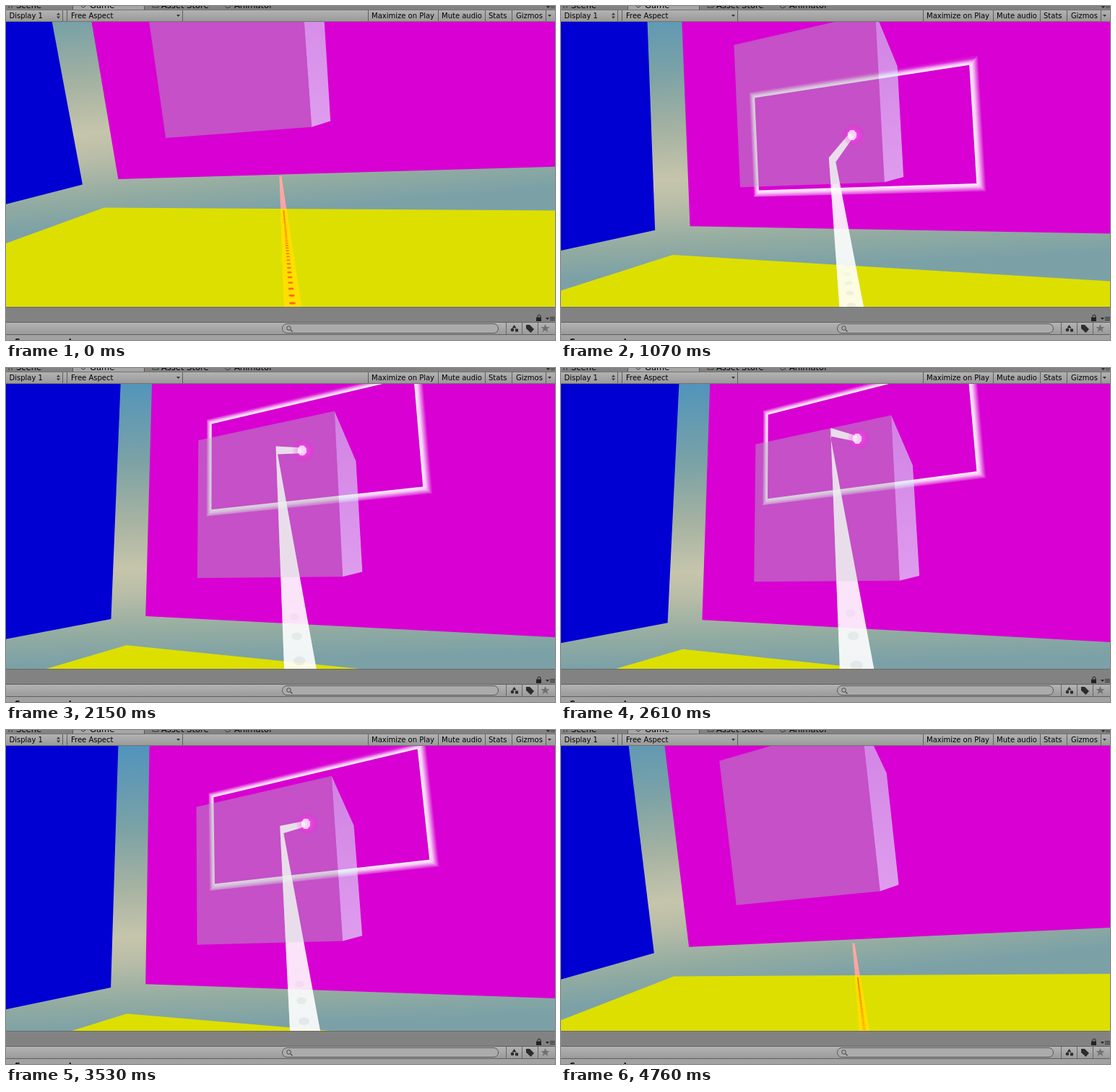
Recreate the animation shown at these times as an HTML page with a canvas. Size 760 by 463 pixels, loop 4.84 s.

```html
<!DOCTYPE html>
<html lang="en">
<head>
<meta charset="utf-8">
<title>Pointer beam in a game view</title>
<style>
  html, body { margin: 0; width: 100%; height: 100%; overflow: hidden; background: #828282; }
  svg { position: absolute; left: 0; top: 0; }
  canvas { position: absolute; left: 0; top: 22px; }
  text { font-family: "DejaVu Sans", sans-serif; font-size: 10px; fill: #000; }
  .tab { font-size: 11.5px; }
  .bold { font-size: 11px; font-weight: bold; }
</style>
</head>
<body>
<svg width="760" height="463" viewBox="0 0 760 463">
  <defs>
    <linearGradient id="bar" x1="0" y1="0" x2="0" y2="1">
      <stop offset="0" stop-color="#b4b4b4"/>
      <stop offset="1" stop-color="#999"/>
    </linearGradient>
  </defs>
  <rect width="760" height="463" fill="#828282"/>
  <path d="M93 0H191V5H93Z" fill="#a6a6a6"/>
  <path d="M92.500 0V5M191.500 0V5" stroke="#555"/>
  <text class="tab" x="14" y="3">Scene</text>
  <text class="tab" x="116" y="3">Game</text>
  <text class="tab" x="215" y="3">Asset Store</text>
  <text class="tab" x="316" y="3">Animator</text>
  <path d="M4 0V3M8 0V3M104 0q3 4 6 0M203 0V2H211V0M303 0l3 3 5-2" fill="none" stroke="#333"/>
  <path d="M748 0H753L750.500 3ZM754 .5H760M754 2.500H760" fill="#333" stroke="#333" stroke-width=".7"/>
  <rect y="5" width="760" height="17" fill="url(#bar)"/>
  <path d="M0 5.500H760M0 21.500H760" stroke="#737373"/>
  <path d="M78.500 6V21M84.500 6V21M244.500 6V21M501.500 6V21M598.500 6V21M663.500 6V21M700.500 6V21M747.500 6V21" stroke="#5e5e5e"/>
  <path d="M70 12.500L72.500 9.500 75 12.500ZM70 14.500H75L72.500 17.500ZM236 12H241L238.500 15ZM750 12H755L752.500 15Z" fill="#333"/>
  <text x="4.500" y="17">Display 1</text>
  <text x="90" y="17">Free Aspect</text>
  <text x="506" y="17">Maximize on Play</text>
  <text x="603" y="17">Mute audio</text>
  <text x="668" y="17">Stats</text>
  <text x="706" y="17">Gizmos</text>

  <path d="M0 417.500H760" stroke="#6a6a6a"/>
  <path d="M734 431.500H741V437H734Z" fill="#222"/>
  <path d="M736 431.500V430a2 2 0 0 1 4 0V432" fill="none" stroke="#222"/>
  <path d="M747 432H752L749.500 435Z" fill="#222"/>
  <path d="M753 431.500H760M753 433.500H760M753 435.500H760" stroke="#333"/>
  <rect y="438" width="760" height="18" fill="url(#bar)"/>
  <path d="M0 438.500H760M0 455.500H760" stroke="#606060"/>
  <rect x="382.500" y="440.500" width="299" height="13" rx="6.500" fill="#ababab" stroke="#585858"/>
  <path d="M394 449L396.500 451.500" stroke="#444" stroke-width="1.200"/>
  <circle cx="391.500" cy="446.500" r="2.800" fill="none" stroke="#444"/>
  <path d="M692.500 439V455M714.500 439V455M736.500 439V455" stroke="#666"/>
  <path d="M703.500 442l3 4.500h-6ZM705 447.500h4v4h-4Z" fill="#2c2c2c"/>
  <circle cx="701" cy="449" r="2.300" fill="#2c2c2c"/>
  <path d="M720 442h5l6 6-4.500 5-6.500-6Z" fill="#2c2c2c"/>
  <path d="M746.500 441l1.700 4h4.300l-3.400 2.800 1.300 4.300-3.900-2.600-3.900 2.600 1.300-4.300-3.400-2.800h4.300Z" fill="#707070"/>
  <rect y="456" width="760" height="7" fill="#a2a2a2"/>
  <text class="bold" x="12" y="469">Scene sounds</text>
</svg>
<canvas id="view" width="760" height="395"></canvas>
<script>
const ctx = document.getElementById('view').getContext('2d');
const LOOP = 4840, STEPS = 63;
const TOP = 22, BOTTOM = 417, CX = 380, CY = 219.5, FOCAL = 430;

// Head and hand: step, yaw, pitch, roll (degrees), pointer tip on screen (x, y).
const MOVES = [
  [0, -17.8, -8.7, 5, 380, 237],
  [14, -20.3, 1.35, 2.9, 402, 179],
  [22, -21.8, 5.5, 1.9, 408, 142],
  [34, -22.8, 7.8, 1.4, 409, 98],
  [46, -22.3, 7.7, 2.4, 414, 130],
  [54, -20.5, 3.1, 4.7, 417, 208],
  [62, -19.6, -.95, 6.4, 405, 297]
];

// Room seen from the origin: x to the right, y up, z towards the pink wall.
const WALL_Z = 10, WALL_X = -10.27, WALL_Y = -1.96, FAR = 18;
const BLUE_X = -11.15, GAP_Z = 9.1, FLOOR_Y = -2.9;
const AREA = { w: 4, h: 2, rim: .24 };

const add = (a, b, s = 1) => a.map((v, i) => v + b[i] * s);
const dot = (a, b) => a.reduce((sum, v, i) => sum + v * b[i], 0);
const clamp = v => Math.min(1, Math.max(0, v));

// Smooth cubic through the moves.
function move(k) {
  let i = 0;
  while (i < MOVES.length - 2 && k >= MOVES[i + 1][0]) i++;
  const a = MOVES[i], b = MOVES[i + 1], h = b[0] - a[0], u = (k - a[0]) / h, w = 1 - u;
  const slope = (j, c) => (MOVES[j + 1][c] - MOVES[j][c]) / (MOVES[j + 1][0] - MOVES[j][0]);
  const tangent = (j, c) => {
    if (j === 0) return slope(0, c);
    if (j === MOVES.length - 1) return slope(j - 1, c);
    const p = MOVES[j][0] - MOVES[j - 1][0], q = MOVES[j + 1][0] - MOVES[j][0];
    return (slope(j - 1, c) * q + slope(j, c) * p) / (p + q);
  };
  return a.map((v, c) =>
    w * w * ((1 + 2 * u) * v + u * h * tangent(i, c)) +
    u * u * ((3 - 2 * u) * b[c] - w * h * tangent(i + 1, c)));
}

let cam;
function aimCamera(yaw, pitch, roll) {
  const [a, p, r] = [yaw, pitch, roll].map(d => d * Math.PI / 180);
  const side = [Math.cos(a), 0, -Math.sin(a)];
  const lift = [-Math.sin(a) * Math.sin(p), Math.cos(p), -Math.cos(a) * Math.sin(p)];
  cam = {
    pitch: p, roll: r,
    right: side.map((v, i) => v * Math.cos(r) - lift[i] * Math.sin(r)),
    up: side.map((v, i) => v * Math.sin(r) + lift[i] * Math.cos(r)),
    ahead: [Math.sin(a) * Math.cos(p), Math.sin(p), Math.cos(a) * Math.cos(p)]
  };
}

const toCam = p => [dot(p, cam.right), dot(p, cam.up), dot(p, cam.ahead)];
const toScreen = ([x, y, z]) => [CX + FOCAL * x / z, CY - FOCAL * y / z];
const project = p => toScreen(toCam(p));

function onWall([x, y]) {
  const ray = add(add(cam.ahead, cam.right, (x - CX) / FOCAL), cam.up, (CY - y) / FOCAL);
  return ray.map(v => v * WALL_Z / ray[2]);
}

function poly(points, fill) {
  ctx.beginPath();
  for (const p of points) ctx.lineTo(p[0], p[1]);
  ctx.closePath();
  ctx.fillStyle = fill;
  ctx.fill();
}

// Fills a flat 3D shape, cut at the near plane.
function face(points, fill) {
  const near = .3, cut = [], view = points.map(toCam);
  view.forEach((p, i) => {
    const q = view[(i + 1) % view.length];
    if (p[2] > near) cut.push(p);
    if ((p[2] > near) !== (q[2] > near)) {
      const t = (near - p[2]) / (q[2] - p[2]);
      cut.push(p.map((v, j) => v + (q[j] - v) * t));
    }
  });
  poly(cut.map(toScreen), fill);
}

function ramp(from, to, stops) {
  const g = ctx.createLinearGradient(...from, ...to);
  for (const [at, color] of stops) g.addColorStop(at, color);
  return g;
}

function ellipse(x, y, rx, ry, fill) {
  ctx.beginPath();
  ctx.ellipse(x, y, rx, ry, 0, 0, 2 * Math.PI);
  ctx.fillStyle = fill;
  ctx.fill();
}

function drawRoom() {
  const level = [CX, CY + FOCAL * Math.tan(cam.pitch)];
  const down = [Math.sin(cam.roll), Math.cos(cam.roll)];
  ctx.fillStyle = ramp(add(level, down, -270), add(level, down, 130), [
    [0, '#4e93bd'], [.3, '#7ba2a6'], [.5, '#a5b2a1'], [.675, '#c6c5ac'],
    [.76, '#b9bda7'], [.9, '#92aba1'], [1, '#7ba1a7']
  ]);
  ctx.fillRect(0, TOP, 760, BOTTOM - TOP);
  face([[BLUE_X, WALL_Y, GAP_Z], [BLUE_X, FAR, GAP_Z], [BLUE_X, FAR, 0], [BLUE_X, WALL_Y, 0]], '#0000d2');
  face([[WALL_X, WALL_Y, WALL_Z], [WALL_X, FAR, WALL_Z], [FAR, FAR, WALL_Z], [FAR, WALL_Y, WALL_Z]], '#d800d2');
  face([[WALL_X, FLOOR_Y, GAP_Z], [FAR, FLOOR_Y, GAP_Z], [FAR, FLOOR_Y, 0], [WALL_X, FLOOR_Y, 0]], '#dddf00');
}

function drawArea(center) {
  const corners = (w, h) => [[-w, h], [w, h], [w, -h], [-w, -h]].map(([x, y]) => project(add(center, [x, y, 0])));
  const out = corners(AREA.w, AREA.h), inn = corners(AREA.w - AREA.rim, AREA.h - AREA.rim);
  for (let i = 0; i < 4; i++) {
    const j = (i + 1) % 4, edge = add(inn[j], inn[i], -1), len = Math.hypot(...edge);
    const normal = [edge[1] / len, -edge[0] / len];
    const from = add(inn[i], edge, .5), depth = dot(add(out[i], inn[i], -1), normal);
    poly([inn[i], inn[j], out[j], out[i]], ramp(from, add(from, normal, depth), [
      [0, 'rgba(255,255,255,.96)'], [.35, 'rgba(255,255,255,.8)'], [1, 'rgba(255,255,255,.08)']
    ]));
  }
}

function drawCube() {
  const x0 = -3.84, x1 = -1.02, y0 = -.21, y1 = 2.58, z0 = 5, z1 = 7.6;
  const backX = -1.08, backTop = 2.5;
  face([[x0, y1, z0], [x1, y1, z0], [x1, y0, z0], [x0, y0, z0]], 'rgba(174,178,184,.45)');
  face([[x1, y1, z0], [backX, backTop, z1], [backX, y0, z1], [x1, y0, z0]],
    ramp(project([x1, y1, z0]), project([backX, y0, z1]), [
      [0, 'rgba(205,224,241,.58)'], [1, 'rgba(226,255,255,.61)']
    ]));
}

// The higher the hand points, the wider and the more bent the beam looks.
function shapeBeam(k, tip) {
  const y = tip[1], center = 397 + .37 * k, half = 32 - .085 * y;
  const bend = [tip[0] - 36 + .118 * (y - 98), y + .536 * (y - 115)];
  const dx = tip[0] - bend[0], dy = y - bend[1];
  const normal = (a, b, size) => [-b * size / Math.hypot(a, b), a * size / Math.hypot(a, b)];
  return {
    tip, bend, center, half,
    base: [[center - half, BOTTOM], [center + half, BOTTOM]],
    elbow: normal(dx, dy - 8, 5.6),
    end: normal(dx, dy, 3.8),
    squash: .8 - .0031 * (y - 98),
    step: Math.min(.45, .37 - .0028 * (y - 237)) / 1000
  };
}

// Discs run away from the viewer, so the inverse of their distance grows evenly.
function drawDiscs(k, b, start, near, paint) {
  const phase = (.45 + k / 24) % 1, span = BOTTOM - start[1];
  for (let n = 1; n < 120; n++) {
    const d = 1 / ((n + phase) * b.step), u = d / span;
    if (d > span + 8) continue;
    if (d < near) break;
    const rx = u * b.half * .38;
    paint(start[0] + (b.center - start[0]) * u, start[1] + d, rx, rx * b.squash, u);
  }
}

function drawMiss(k, b) {
  const [x, y] = b.tip;
  ctx.globalCompositeOperation = 'lighter';
  poly([[x - 1.5, y], [x + 1.5, y], b.base[1], b.base[0]], 'rgb(125,0,0)');
  ctx.globalCompositeOperation = 'source-over';
  ellipse(x, y, 2, 2, '#f3a59c');
  drawDiscs(k, b, b.tip, 46, (px, py, rx, ry) =>
    ellipse(px, py, rx, Math.max(ry, .6), `rgba(255,85,0,${Math.min(.9, .45 + .28 * ry)})`));
}

function drawBeam(b, alpha) {
  poly([b.base[0], add(b.bend, b.elbow, -1), add(b.tip, b.end, -1),
        add(b.tip, b.end), add(b.bend, b.elbow), b.base[1]], `rgba(255,255,255,${alpha})`);
}

function drawTip([x, y]) {
  const blob = [];
  for (let i = 0; i < 8; i++) {
    const a = (i + .5) * Math.PI / 4;
    blob.push([x + 1 + 6.5 * Math.cos(a), y + 7.5 * Math.sin(a)]);
  }
  poly(blob, 'rgba(255,255,255,.75)');
}

function drawGlow([x, y]) {
  const glow = ctx.createRadialGradient(x + 3, y, 2, x + 3, y, 15);
  glow.addColorStop(0, 'rgba(255,80,250,.85)');
  glow.addColorStop(.5, 'rgba(245,55,232,.65)');
  glow.addColorStop(1, 'rgba(235,40,220,.15)');
  ellipse(x + 3, y, 15, 15, glow);
}

function draw(k) {
  const [, yaw, pitch, roll, x, y] = move(k);
  aimCamera(yaw, pitch, roll);
  const b = shapeBeam(k, [x, y]), target = onWall(b.tip);
  const hit = target[1] > WALL_Y + .3;

  ctx.setTransform(1, 0, 0, 1, 0, -TOP);
  drawRoom();
  if (!hit) {
    drawMiss(k, b);
    drawCube();
    return;
  }
  drawArea(target);
  drawBeam(b, .8);
  drawCube();
  drawGlow(b.tip);
  drawBeam(b, .45);
  drawTip(b.tip);
  drawDiscs(k, b, b.bend, 120, (px, py, rx, ry, u) => {
    const alpha = .1 * clamp((u - .68) / .15) * clamp((ry - 1.5) / 2);
    ellipse(px, py, rx, ry, `rgba(110,125,135,${alpha})`);
  });
}

let shown = -1;
const begin = performance.now();
function tick() {
  const t = (performance.now() - begin) % LOOP;
  const k = Math.min(STEPS - 1, Math.floor((t + 7) * STEPS / LOOP));
  if (k !== shown) draw(shown = k);
  requestAnimationFrame(tick);
}
tick();
</script>
</body>
</html>
```
